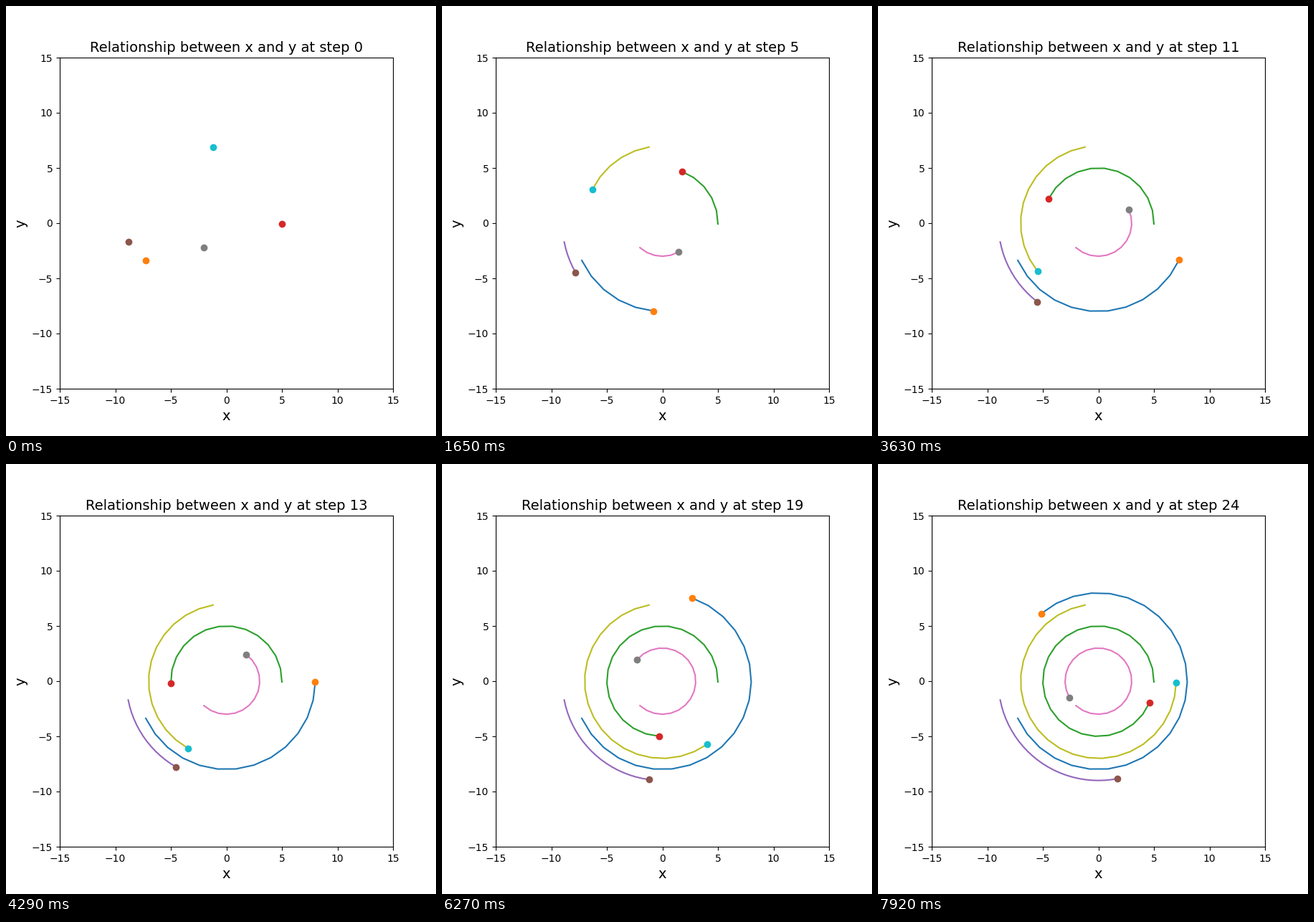
Recreate the animation shown at these times as a matplotlib script. Size 600 by 600 pixels, loop 8000 ms.

```python
import numpy as np
import matplotlib.pyplot as plt
from matplotlib.animation import FuncAnimation

LOOP_MS = 8000
STEP_MS = 330
TICK_MS = 20


class Orbiter:
    """A dot on a circle round the origin, with the path behind it."""

    def __init__(self, ax, radius, start, turn):
        self.radius, self.start, self.turn = radius, start, turn
        self.trail, = ax.plot([], [])
        self.head, = ax.plot([], [], "o")

    def show(self, step):
        angle = np.radians(self.start + self.turn * np.arange(step + 1))
        x, y = self.radius * np.cos(angle), self.radius * np.sin(angle)
        self.trail.set_data(x, y)
        self.head.set_data(x[-1:], y[-1:])


fig, ax = plt.subplots(figsize=(6, 6), dpi=100)
ax.set(xlim=(-15, 15), ylim=(-15, 15))
ax.set_xlabel("x", fontsize=14)
ax.set_ylabel("y", fontsize=14)
title = ax.set_title("", fontsize=14)

# start angle and turn per step in degrees
orbiters = [
    Orbiter(ax, radius=8, start=204.95, turn=11.88),
    Orbiter(ax, radius=5, start=-0.8, turn=14.08),
    Orbiter(ax, radius=9, start=190.95, turn=3.755),
    Orbiter(ax, radius=3, start=227.7, turn=14.28),
    Orbiter(ax, radius=7, start=99.9, turn=10.8),
]


def update(i):
    # each tick shows the step reached by its middle
    step = (i * TICK_MS + TICK_MS // 2) // STEP_MS
    title.set_text(f"Relationship between x and y at step {step}")
    for orbiter in orbiters:
        orbiter.show(step)


anim = FuncAnimation(fig, update, frames=LOOP_MS // TICK_MS,
                     init_func=lambda: update(0), interval=TICK_MS,
                     repeat=True, repeat_delay=0)
plt.show()
```
